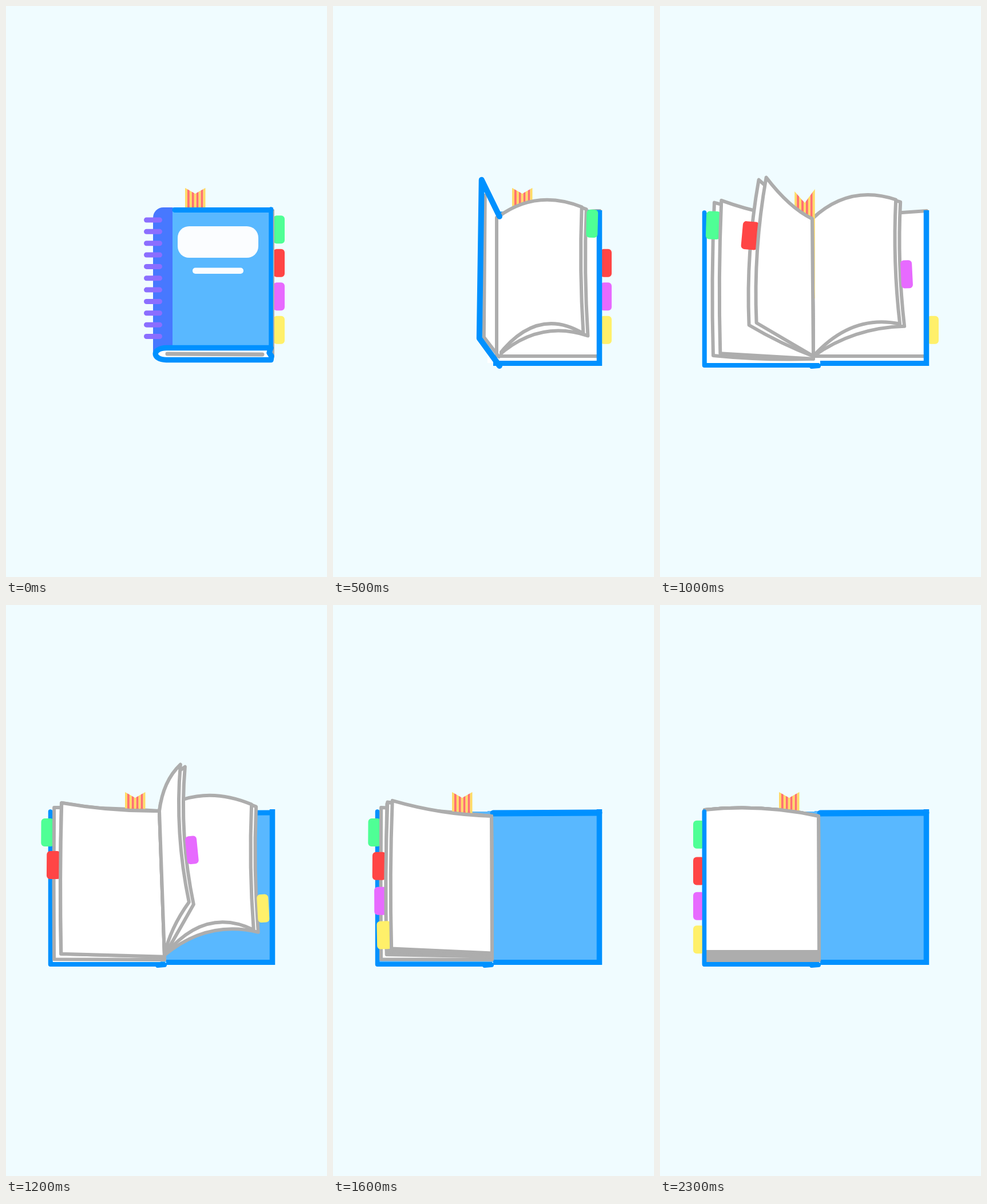
Animation of 561x998 px, one loop 2400 ms. Source, as an HTML page with a canvas:

```html
<!DOCTYPE html>
<html lang="en">
<head>
<meta charset="utf-8">
<title>Notebook</title>
<style>
html, body { margin: 0; width: 100%; height: 100%; overflow: hidden; background: #f0fcff; }
canvas { display: block; width: 100vw; height: 100vh; }
</style>
</head>
<body>
<canvas id="stage" width="561" height="998"></canvas>
<script>
const ctx = document.getElementById('stage').getContext('2d');
const STEP = 100, STEPS = 24;
const BLUE = '#0091ff', SKY = '#59b8ff', GRAY = '#adadad', WHITE = '#ffffff';
const PEN = 6, MIDDLE = 278, TOP = 358, BOTTOM = 612;

// Turning angle in degrees by step: 0 lies right, 180 lies left
const LEAVES = [
  { color: '#4fff95', turn: [[4, 0], [5, 34], [8, 105], [10, 149], [12, 166], [16, 166], [23, 180]] },
  { color: '#ff4545', turn: [[7, 0], [8, 50], [10, 118], [12, 155], [16, 157], [23, 180]] },
  { color: '#e76aff', turn: [[9, 0], [10, 45], [12, 82], [16, 154], [23, 180]] },
  { color: '#fff06a', turn: [[11, 0], [12, 37], [16, 151], [23, 180]] }
];
// Step, spine top x and y, spine bottom x
const HINGE = [[5, 288, 369, 288], [8, 281, 358, 281], [10, 266, 372, 268], [12, 268, 360, 277], [16, 277, 369, 278]];

const clamp = (v, lo = 0, hi = 1) => Math.min(hi, Math.max(lo, v));
const radians = deg => deg * Math.PI / 180;

function track(keys, s) {
  const n = keys.findIndex(k => k[0] >= s);
  if (n === 0) return keys[0].slice(1);
  if (n < 0) return keys[keys.length - 1].slice(1);
  const a = keys[n - 1], b = keys[n], u = (s - a[0]) / (b[0] - a[0]);
  return a.slice(1).map((v, i) => v + (b[i + 1] - v) * u);
}

function line(color, width, ...p) {
  ctx.beginPath();
  for (let i = 0; i < p.length; i += 2) ctx.lineTo(p[i], p[i + 1]);
  ctx.strokeStyle = color;
  ctx.lineWidth = width;
  ctx.stroke();
}

function box(color, x, y, w, h, r = 0) {
  ctx.beginPath();
  ctx.roundRect(x, y, w, h, r);
  ctx.fillStyle = color;
  ctx.fill();
}

// Outline of a turning leaf, worked out from its angle
function leafPose(i, s) {
  const angle = radians(track(LEAVES[i].turn, s)[0]);
  const c = Math.cos(angle), k = Math.sin(angle), wave = Math.sin(2 * angle);
  const right = c > 0, landed = clamp(-c);
  const [ax, ay, dx] = track(HINGE, s);

  const sink = (9 - 5 * i) * landed ** 4;
  const bx = MIDDLE + (194 - 6 * c) * c;
  const by = TOP - 82 * k ** (3.3 + 1.2 * c);
  const cx = bx + 28 * clamp(4 * c, -1, 1) * k ** 4;
  const cy = BOTTOM - (92 + 20 * c) * k ** (2.4 - 0.8 * c) + sink;
  const dy = BOTTOM + sink;

  const lean = right ? -12 * k : 0;
  const arch = (right ? 44 : 20) * wave + 16 * landed ** 8;
  const scoop = 130 * clamp(c) ** 3 * wave;
  const gap = clamp((k - 0.42) * 10);
  return {
    c, k, right,
    a: [ax, ay], b: [bx, by], c2: [cx, cy], d: [dx, dy],
    top: [(ax + bx) / 2 + lean, (ay + by) / 2 - arch],
    side: [(bx + cx) / 2 - 18 * k * k, (by + cy) / 2],
    base: [(cx + dx) / 2 + lean, (cy + dy) / 2 - scoop],
    rear: [(right ? 8 : -13) * gap, 4 * gap]
  };
}

function sheet(p, [sx, sy] = [0, 0]) {
  const drop = sy * (p.right ? 6 : 2);
  ctx.beginPath();
  ctx.moveTo(...p.a);
  ctx.quadraticCurveTo(...p.top, p.b[0] + sx, p.b[1] + sy);
  ctx.quadraticCurveTo(p.side[0] + sx, p.side[1] + sy, p.c2[0] + sx, p.c2[1] + sy);
  ctx.quadraticCurveTo(p.base[0] + sx / 2, p.base[1] + drop, ...p.d);
  ctx.closePath();
  ctx.fillStyle = WHITE;
  ctx.fill();
  ctx.strokeStyle = GRAY;
  ctx.lineWidth = PEN;
  ctx.stroke();
}

// A tab sits on the outer edge and leans with it
function tab(i, p) {
  const left = (1 - p.c) / 2;
  const f = (33 + 58 * i + left * (9 + 5 * i)) / 252, g = 1 - f;
  const at = n => g * g * p.b[n] + 2 * f * g * p.side[n] + f * f * p.c2[n];
  const slope = n => g * (p.side[n] - p.b[n]) + f * (p.c2[n] - p.side[n]);
  const w = p.right ? 20 : 20 + 10 * p.k;
  const shift = p.right ? p.rear[0] + w / 2 + 1 : -w / 2;
  ctx.save();
  ctx.translate(at(0) + shift, at(1));
  ctx.rotate(-Math.atan2(slope(0), slope(1)));
  box(LEAVES[i].color, -w / 2, -25, w, 49, 6);
  ctx.restore();
}

function ribbon(s) {
  const u = clamp((s - 6) / 6), ease = u * u * (3 - 2 * u), bump = Math.sin(Math.PI * u);
  const x = 313 - 105 * ease, y = 318 + 9 * u, w = 35.5;
  const tilt = 14 * bump * (1 - u), notch = 10 + 14 * bump;
  const edge = v => y - tilt * v + notch * (1 - Math.abs(2 * v - 1));
  const foot = v => 525 - 3.4 * tilt * v;
  for (let i = 0; i < 9; i++) {
    const a = i / 9, b = (i + 1) / 9;
    ctx.beginPath();
    for (const v of [a, (a + b) / 2, b]) ctx.lineTo(x + w * v, edge(v));
    ctx.lineTo(x + w * b, foot(b));
    ctx.lineTo(x + w * a, foot(a));
    ctx.fillStyle = i % 2 ? '#ff7070' : '#ffdb66';
    ctx.fill();
  }
}

// Past upright, a leaf is stacked with the left pages
const isLeft = p => p.c < 0.17;

function leaf(i, s) {
  const p = leafPose(i, s), carrier = i === 1;
  if (carrier && isLeft(p)) ribbon(s);
  if (p.rear[0]) sheet(p, p.rear);
  tab(i, p);
  sheet(p);
  if (carrier && !isLeft(p)) ribbon(s);
}

function spine() {
  box('#4778ff', 257, 352, 35, 256, [18, 0, 0, 0]);
  for (let i = 0; i < 11; i++) box('#8b6eff', 241, 369.5 + i * 20.35, 32, 9, 4.5);
}

function label() {
  box('#fbfdff', 300, 385, 141, 55, 20);
  box('#fbfdff', 326, 457.5, 89, 10.5, 5);
}

function closedCover() {
  spine();
  box(SKY, 291, 352, 176, 246);
  line(BLUE, 9, 295, 356.5, 463, 356.5);
  line(BLUE, 7.5, 463, 355, 463, 597);
  label();
  ctx.beginPath();
  ctx.moveTo(463, 597.5);
  ctx.lineTo(280, 597.5);
  ctx.bezierCurveTo(255, 598, 255, 618, 280, 618.5);
  ctx.lineTo(463, 618.5);
  ctx.lineTo(464, 612);
  ctx.lineTo(460, 606);
  ctx.closePath();
  ctx.fillStyle = WHITE;
  ctx.fill();
  ctx.strokeStyle = BLUE;
  ctx.lineWidth = 9.5;
  ctx.stroke();
  line(GRAY, 7, 282, 608, 448, 609);
}

function openingCover(s) {
  const angle = radians(100 * (s / 5) ** 1.4);
  const c = Math.cos(angle), k = Math.sin(angle), outside = c > 0;
  const ax = 291, ay = TOP + 10 * k, dy = 629;
  const bx = ax + 180 * c, by = TOP - 55 * k, cx = bx - 4 * k, cy = dy - 49 * k;
  const frame = [ax, ay, bx, by, cx, cy, ax, dy];
  if (s < 3) spine();
  ctx.beginPath();
  for (let i = 0; i < 8; i += 2) ctx.lineTo(frame[i], frame[i + 1]);
  ctx.fillStyle = outside ? SKY : WHITE;
  ctx.fill();
  if (outside) {
    ctx.save();
    ctx.transform(c, (by - ay) / 180, 0, 1, ax, ay);
    ctx.translate(-291, -356);
    label();
    ctx.restore();
  } else {
    line(GRAY, PEN, bx + 6, by + 27, cx + 8, cy - 2, ax - 1, dy - 16);
    line(GRAY, PEN, ax - 5, ay + 2, ax - 5, dy - 17);
  }
  line(BLUE, 10, ...frame);
}

const leftEdge = () => line(BLUE, 7.5, 77.5, 361, 77.5, 628);

function leftCover(s) {
  box(SKY, 78, 361, 200, 266);
  if (s < 16) box(WHITE, 82, 360, 196, 264);
  if (s < 10) line(GRAY, PEN, 270, 361, 85, 361.5, 85, 500, 89, 618.5, 272, 618);
  line(BLUE, 8, 78, 628, 276, 628);
  line(BLUE, 8, 265, 630, 277, 629);
  leftEdge();
}

function rightCover(s) {
  box(s < 12 ? WHITE : SKY, 270, 360, 194, 264);
  line(BLUE, s < 16 ? 9 : 11, 280, 364, 465, 363);
}

function rightBars(s) {
  if (s < 7) line(BLUE, 5, 440, 359, 466, 359);
  ctx.lineCap = 'butt';
  line(BLUE, 9.5, 465.5, 357, 465.5, 629);
  line(BLUE, 9, 280, 624.5, 470, 624.5);
  ctx.lineCap = 'round';
}

function draw(s) {
  ctx.fillStyle = '#f0fcff';
  ctx.fillRect(0, 0, 561, 998);
  ctx.lineCap = ctx.lineJoin = 'round';

  const resting = i => s <= LEAVES[i].turn[0][0];
  const turned = i => isLeft(leafPose(i, s));
  const downward = [3, 2, 1, 0];
  const moving = downward.filter(i => !resting(i));

  if (s > 6) leftCover(s);
  if (s > 0) rightCover(s);
  downward.filter(resting).forEach(i => leaf(i, s));
  if (s > 0) rightBars(s);
  moving.filter(i => !turned(i)).forEach(i => leaf(i, s));
  moving.filter(turned).reverse().forEach(i => leaf(i, s));

  if (s === 0) closedCover();
  else if (s < 7) openingCover(s);
  if (s >= 20) leftEdge();
}

function tick() {
  draw(Math.floor(performance.now() / STEP) % STEPS);
  requestAnimationFrame(tick);
}
tick();
</script>
</body>
</html>
```
